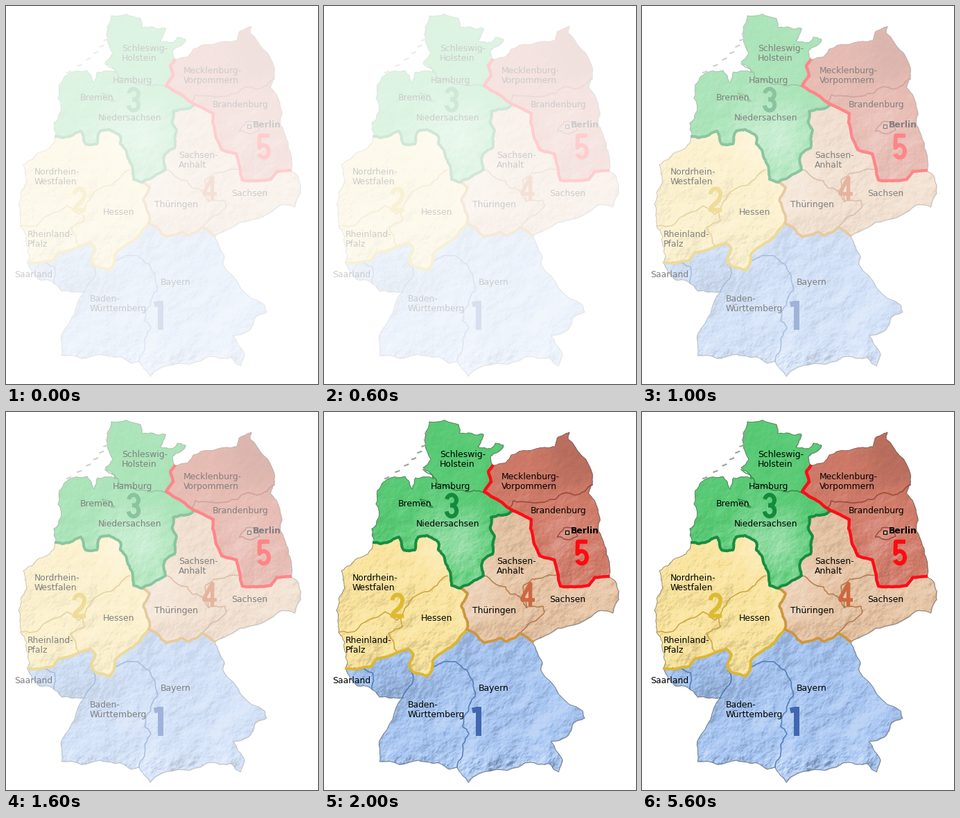
Write a matplotlib script that moves like this. It is 450x545 px and loops after 8 s.

```python
import numpy as np
import matplotlib.pyplot as plt
from matplotlib.animation import FuncAnimation
from matplotlib.patches import Polygon, Rectangle

W, H, DPI = 450, 545, 100
PX = 72 / DPI
rng = np.random.default_rng(12)

fig = plt.figure(figsize=(W / DPI, H / DPI), dpi=DPI, facecolor="white")
ax = fig.add_axes([0, 0, 1, 1])
ax.axis("off")


def rgb(r, g, b):
    return np.array([r, g, b]) / 255


def rough(points, amount=0.1, levels=3):
    """Turn a few key points into a ragged line by midpoint displacement."""
    pts = np.array(points, float)
    for _ in range(levels):
        step = np.diff(pts, axis=0)
        normal = np.column_stack([-step[:, 1], step[:, 0]])
        shift = rng.uniform(-amount, amount, (len(step), 1))
        out = np.empty((2 * len(pts) - 1, 2))
        out[::2] = pts
        out[1::2] = pts[:-1] + step / 2 + normal * shift
        pts = out
    return pts


def draw_line(pts, color, width, z=4, **kw):
    ax.plot(*np.transpose(pts), color=color, lw=width * PX, zorder=z,
            solid_joinstyle="round", **kw)


def ring(*edges):
    return np.vstack(edges)


# Points where three edges meet
WEST, NORTH, EAST = (72, 188), (243, 78), (410, 237)
SOUTHEAST, SOUTHWEST = (301, 331), (32, 370)
NORTH_MID, CENTRE, SOUTH_MID = (272, 142), (196, 254), (206, 313)

# Outer edges, clockwise
coast_green = rough([
    WEST, (69, 168), (79, 152), (77, 113), (92, 97), (117, 93), (127, 111),
    (132, 95), (158, 97), (143, 80), (154, 68), (150, 24), (152, 14),
    (194, 18), (196, 31), (230, 32), (222, 50), (240, 53), (247, 45),
    (259, 48), (240, 64), NORTH], 0.13)
coast_red = rough([
    NORTH, (262, 73), (270, 62), (318, 51), (333, 50), (336, 38), (354, 29),
    (352, 39), (387, 89), (387, 104), (381, 117), (395, 140), (396, 172),
    (407, 205), EAST])
coast_orange = rough([
    EAST, (422, 247), (425, 270), (416, 290), (395, 287), (350, 309),
    SOUTHEAST])
coast_blue = rough([
    SOUTHEAST, (315, 362), (313, 373), (373, 431), (376, 441), (360, 448),
    (352, 466), (327, 475), (344, 502), (338, 519), (325, 507), (296, 505),
    (280, 512), (217, 525), (208, 534), (192, 512), (180, 515), (166, 506),
    (136, 502), (80, 504), (81, 472), (113, 412), (80, 411), (66, 397),
    (48, 395), SOUTHWEST])
coast_yellow = rough([
    SOUTHWEST, (32, 348), (21, 318), (18, 286), (30, 254), (25, 229),
    (48, 211), (63, 205), WEST], 0.13)

# Borders between the five regions
green_yellow = rough([
    WEST, (92, 188), (108, 180), (115, 199), (131, 199), (136, 180),
    (149, 178), (165, 188), (165, 199), (178, 222), (184, 250), CENTRE])
green_orange = rough([
    CENTRE, (211, 247), (230, 236), (229, 214), (243, 205), (246, 179),
    (240, 165), (241, 152), (262, 148), NORTH_MID])
red_green = rough([
    NORTH, (237, 86), (241, 101), (231, 115), (250, 126), NORTH_MID], 0.05)
red_orange = rough([
    NORTH_MID, (299, 155), (298, 168), (303, 190), (311, 207), (332, 213),
    (341, 251), (382, 250), (390, 239), EAST], 0.05)
yellow_blue = rough([
    SOUTHWEST, (68, 367), (76, 356), (122, 342), (129, 350), (123, 368),
    (130, 376), (150, 381), (156, 372), (157, 358), (173, 345), (191, 332),
    SOUTH_MID], 0.06)
yellow_orange = rough([CENTRE, (207, 262), (198, 280), (206, 300), SOUTH_MID])
orange_blue = rough([
    SOUTH_MID, (231, 333), (254, 326), (263, 331), (282, 319), SOUTHEAST])

regions = [
    (ring(coast_green, red_green, green_orange[::-1], green_yellow[::-1]),
     rgb(88, 202, 116)),
    (ring(coast_red, red_orange[::-1], red_green[::-1]), rgb(209, 124, 106)),
    (ring(red_orange, coast_orange, orange_blue[::-1], yellow_orange[::-1],
          green_orange), rgb(231, 197, 165)),
    (ring(coast_yellow, green_yellow, yellow_orange, yellow_blue[::-1]),
     rgb(250, 228, 157)),
    (ring(yellow_blue, orange_blue, coast_blue), rgb(166, 197, 242)),
]
country = ring(coast_green, coast_red, coast_orange, coast_blue, coast_yellow)


def terrain(power):
    """Random heights with a power-law spectrum."""
    fy = np.fft.fftfreq(H)[:, None]
    fx = np.fft.rfftfreq(W)[None, :]
    freq = np.hypot(fx, fy)
    freq[0, 0] = 1
    noise = np.fft.rfft2(rng.standard_normal((H, W)))
    return np.fft.irfft2(noise / freq ** power, s=(H, W))


# Hill shading, stronger towards the south
rows, cols = np.mgrid[:H, :W]
dy, dx = np.gradient(terrain(1.75))
shade = dx + dy
shade = np.clip(shade / shade.std(), -2.2, 2.2)
shade *= np.interp(rows, [90, 230, 480, 525], [0.03, 0.09, 0.13, 0.28])

# Broad light (+) and dark (-) areas: x, y, radius, strength
for x, y, radius, strength in ((185, 185, 50, 0.36), (365, 65, 50, -0.2),
                               (325, 165, 45, 0.14), (275, 180, 45, -0.1),
                               (235, 275, 45, 0.18), (95, 385, 32, -0.18)):
    shade += strength * np.exp(-np.hypot(cols - x, rows - y) ** 2
                               / radius ** 2)

# Soft shadow, then each region with its own tinted relief
ax.add_patch(Polygon(country + 1, fc="#555555", alpha=0.3, lw=0))
for shape, color in regions:
    patch = ax.add_patch(Polygon(shape, fc=color, ec=color, lw=0.5, zorder=2))
    relief = np.empty((H, W, 4))
    relief[..., :3] = np.where(shade[..., None] > 0, 1, 0.4 * color)
    relief[..., 3] = np.clip(np.abs(shade), 0, 0.6)
    image = ax.imshow(relief, extent=(0, W, H, 0), interpolation="nearest",
                      aspect="auto", zorder=2.5)
    image.set_clip_path(patch)
ax.add_patch(Polygon(country, fc="none", ec=rgb(80, 80, 80), lw=0.8 * PX,
                     alpha=0.7, zorder=3))

# Small islands off the north-west coast
for t in np.linspace(0, 1, 8):
    x, y = 148 - 58 * t ** 2, 30 + 65 * t
    draw_line(rough([(x - 2, y + 1), (x + 3, y - 1)]), rgb(150, 160, 150), 2)

# Thin state borders
GREEN, BROWN = rgb(48, 130, 68), rgb(174, 112, 66)
BLUE, GOLD, MAROON = rgb(68, 112, 178), rgb(196, 156, 44), rgb(146, 66, 54)
thin_borders = [
    (GREEN, [(143, 83), (164, 104), (201, 113), (231, 116)]),
    (GREEN, [(139, 126), (151, 128), (157, 137), (143, 132), (139, 126)]),
    (MAROON, [(269, 137), (273, 128), (318, 130), (350, 116), (362, 120),
              (387, 105)]),
    (MAROON, [(337, 180), (346, 167), (363, 170), (366, 179), (350, 184),
              (337, 180)]),
    (BROWN, [(230, 236), (262, 252), (268, 262), (283, 267), (292, 282)]),
    (BROWN, [(340, 234), (300, 241), (287, 252), (292, 282)]),
    (BROWN, [(292, 282), (316, 280), (318, 288), (297, 304), (283, 320)]),
    (GOLD, [(22, 317), (45, 316), (88, 288), (106, 300), (116, 284),
            (134, 264), (163, 250), (178, 236)]),
    (GOLD, [(111, 296), (113, 309), (93, 319), (106, 348)]),
    (BLUE, [(44, 369), (70, 376), (69, 399)]),
    (BLUE, [(126, 374), (127, 392), (113, 412)]),
    (BLUE, [(157, 367), (190, 360), (206, 372), (218, 410), (200, 453),
            (209, 464), (200, 480), (192, 512)]),
]
for color, pts in thin_borders:
    draw_line(rough(pts, 0.13), color, 1.6, alpha=0.85)

# Heavy region borders
draw_line(yellow_blue, rgb(217, 182, 54), 4)
draw_line(ring(yellow_orange, orange_blue), rgb(206, 150, 62), 3.8)
draw_line(ring(green_yellow, green_orange), rgb(24, 140, 64), 4)
draw_line(ring(red_green, red_orange), rgb(255, 12, 24), 4.4)


def arc(cx, cy, rx, ry, start, stop):
    t = np.radians(np.linspace(start, stop, 24))
    return np.column_stack([cx + rx * np.cos(t), cy + ry * np.sin(t)])


# Narrow numerals in a unit box, y downwards
digits = {
    1: [[(0.05, 0.13), (0.62, 0.08)], [(0.62, 0), (0.62, 1)]],
    2: [ring(arc(0.5, 0.29, 0.36, 0.22, 180, 372),
             [(0.72, 0.54), (0.2, 0.8), (0.14, 0.92), (0.97, 0.92)])],
    3: [ring(arc(0.5, 0.28, 0.35, 0.21, 190, 450), [(0.4, 0.49)]),
        ring([(0.4, 0.49)], arc(0.5, 0.71, 0.36, 0.22, -90, 175))],
    4: [[(0.68, 1), (0.68, 0.07), (0.1, 0.66), (0.1, 0.74), (1, 0.74)]],
    5: [ring([(0.9, 0.08), (0.2, 0.08), (0.17, 0.47)],
             arc(0.48, 0.69, 0.37, 0.24, 215, 515))],
}


def draw_digit(n, x, y, h, color, stroke=6):
    w = 16 if n == 1 else 20
    for part in digits[n]:
        draw_line(np.array(part) * (w, h) + (x, y), color, stroke, 5,
                  solid_capstyle="butt")


draw_digit(1, 213, 425, 42, rgb(64, 104, 178), 8)
draw_digit(2, 96, 261, 36, rgb(222, 186, 48))
draw_digit(3, 174, 117, 36, rgb(20, 138, 62))
draw_digit(4, 284, 245, 35, rgb(206, 104, 64), 5.4)
draw_digit(5, 362, 184, 37, rgb(255, 10, 16))

labels = [
    (167, 65, "Schleswig-\nHolstein"), (154, 111, "Hamburg"),
    (107, 136, "Bremen"), (133, 165, "Niedersachsen"),
    (256, 97, "Mecklenburg-\nVorpommern"), (298, 146, "Brandenburg"),
    (249, 219, "Sachsen-\nAnhalt"), (325, 274, "Sachsen"),
    (214, 290, "Thüringen"), (41, 243, "Nordrhein-\nWestfalen"),
    (140, 301, "Hessen"), (31, 333, "Rheinland-\nPfalz"),
    (12, 391, "Saarland"), (223, 402, "Bayern"),
    (121, 426, "Baden-\nWürttemberg"), (356, 175, "Berlin"),
]
LINE_HEIGHT = 13.7
for x, y, text in labels:
    for row, line in enumerate(text.split("\n")):
        ax.text(x, y + row * LINE_HEIGHT, line, family="DejaVu Sans",
                size=12.4 * PX, color="black", va="baseline", zorder=6,
                weight="bold" if line == "Berlin" else "normal")
ax.add_patch(Rectangle((348, 170.5), 5, 5, fc="#c9b0a8", ec="black",
                       lw=1.2 * PX, zorder=6))

# The map appears in three steps from behind a white veil
veil = ax.add_patch(Rectangle((0, 0), W, H, fc="white", lw=0, zorder=10))
VEIL_STEPS = (0.8, 0.5, 0.0)
ax.set_xlim(0, W)
ax.set_ylim(H, 0)


def update(frame):
    veil.set_alpha(VEIL_STEPS[min(frame, 2)])
    return (veil,)


anim = FuncAnimation(fig, update, frames=8, interval=1000, repeat=True,
                     repeat_delay=0)
plt.show()
```
